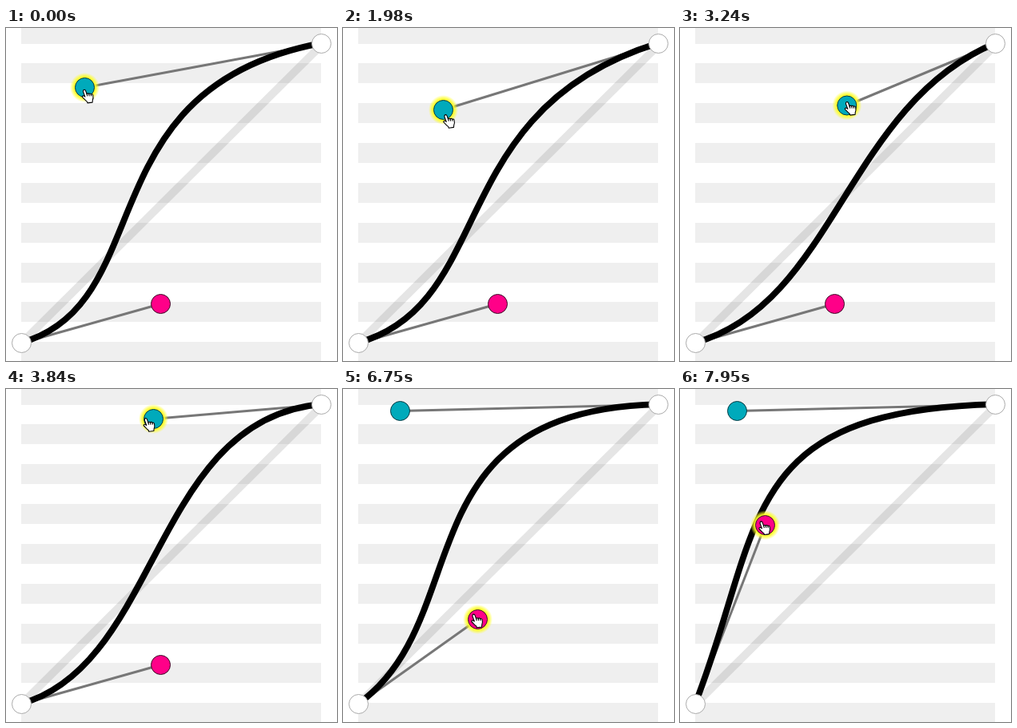
An HTML page for the animation above (8000 ms loop, 414x417 px).

```html
<!DOCTYPE html>
<html lang="en">
<head>
<meta charset="utf-8">
<title>Curve editor</title>
<style>
  html, body { margin: 0; width: 100%; height: 100%; overflow: hidden; background: #fff; }
  svg { display: block; width: 414px; height: 417px; }
</style>
</head>
<body>
<svg viewBox="0 0 414 417" xmlns="http://www.w3.org/2000/svg">
  <defs>
    <radialGradient id="halo">
      <stop offset=".7" stop-color="#ff2" stop-opacity=".95"/>
      <stop offset=".8" stop-color="#ff2" stop-opacity=".7"/>
      <stop offset="1" stop-color="#ff2" stop-opacity="0"/>
    </radialGradient>
    <clipPath id="plot"><rect x="19" width="375" height="417"/></clipPath>
  </defs>
  <g id="stripes" fill="#efefef"></g>
  <path d="M14.5 399.5L400 16" stroke="#000" stroke-opacity=".1" stroke-width="10" clip-path="url(#plot)"/>
  <g stroke="#777" stroke-width="3">
    <line id="armA" x1="19.5" y1="394.5"/>
    <line id="armB" x1="394.5" y1="19.5"/>
  </g>
  <path id="curve" fill="none" stroke="#000" stroke-width="7.8" transform="translate(-.4 -.4)"/>
  <g fill="#fff" stroke="#aaa">
    <circle cx="19.5" cy="394.5" r="12"/>
    <circle cx="394.5" cy="19.5" r="12"/>
  </g>
  <g id="knobA">
    <circle class="halo" r="18.5" fill="url(#halo)"/>
    <circle r="12" fill="#f08" stroke="#3a1028"/>
  </g>
  <g id="knobB">
    <circle class="halo" r="18.5" fill="url(#halo)"/>
    <circle r="12" fill="#0ab" stroke="#053a42"/>
  </g>
  <g id="hand" stroke="#000" stroke-width="1.1" stroke-linejoin="round" stroke-linecap="round">
    <path fill="#fff" d="M2.2 1.6C3 .4 4.6 .6 5.1 2L6.6 6.2C7 5.2 8.6 5 9.2 6.3C9.8 5.2 11.4 5.3 11.8 6.6C12.6 5.8 14 6.3 14.2 7.6C14.8 10 14.7 12 13.8 14L13.6 16.6L7.4 17.4L6.8 15.6C4.8 14.2 3.2 12.2 1.2 10.4C.2 9.2 1.6 7.8 3 8.6L4.4 9.6L2 3.2Z"/>
    <path fill="none" d="M6.6 6.2L7.3 8.4M9.2 6.3L9.7 8.4M11.8 6.6L12.1 8.4"/>
  </g>
</svg>
<script>
const LOOP = 8000, STEP = 30;
const LEAD = 80;                      // the pointer runs this far ahead of the knob, in ms
const LEAVE = 5220, ARRIVE = 6170, GRAB = 6270;
const $ = id => document.getElementById(id);

// Drag paths: [ms, x, y]
const teal = [
  [1230, 98.5, 74.5], [1980, 125.5, 102.5], [2580, 155.5, 124.5], [3200, 208, 100],
  [3840, 184.5, 37.5], [4500, 82, 29], [4890, 71.5, 27.5]
];
const pink = [
  [6450, 193.5, 345.5], [6750, 168.5, 288.5], [7950, 106.5, 170.5], [8100, 100, 160]
];

const clamp = u => Math.min(Math.max(u, 0), 1);
const ease = u => u * u * (3 - 2 * u);

function slope(keys, i, c) {
  const a = keys[i - 1], b = keys[i + 1];
  return a && b ? (b[c] - a[c]) / (b[0] - a[0]) : 0;
}

// Smooth Hermite path through the keys, at rest at both ends
function at(keys, t) {
  let i = 0;
  while (i < keys.length - 2 && t >= keys[i + 1][0]) i++;
  const a = keys[i], b = keys[i + 1], span = b[0] - a[0];
  const u = clamp((t - a[0]) / span), v = 1 - u;
  return [1, 2].map(c =>
    ease(v) * a[c] + ease(u) * b[c] +
    span * u * v * (v * slope(keys, i, c) - u * slope(keys, i + 1, c)));
}

function pointer(t) {
  const from = at(teal, t + LEAD), to = at(pink, t + LEAD);
  const u = ease(clamp((t - LEAVE) / (ARRIVE - LEAVE)));
  return [from[0] + (to[0] - from[0]) * u - 4, from[1] + (to[1] - from[1]) * u + 2];
}

function place(el, [x, y]) {
  el.setAttribute("transform", `translate(${x.toFixed(2)} ${y.toFixed(2)})`);
}

function knob(name, p, active) {
  const el = $("knob" + name), arm = $("arm" + name);
  place(el, p);
  el.querySelector(".halo").style.display = active ? "" : "none";
  arm.setAttribute("x2", p[0]);
  arm.setAttribute("y2", p[1]);
}

function draw(ms) {
  const t = Math.floor(ms / STEP) * STEP, a = at(pink, t), b = at(teal, t);
  knob("A", a, t >= GRAB);
  knob("B", b, t < GRAB);
  $("curve").setAttribute("d", `M19.5 394.5C${a} ${b} 394.5 19.5`);
  place($("hand"), pointer(t));
}

for (let k = 0; k < 9; k++) {
  const y = Math.round(k * 49.85 - 5.5);
  $("stripes").innerHTML += `<rect x="19" y="${y}" width="375" height="25"/>`;
}

const start = performance.now();
function loop() {
  draw((performance.now() - start) % LOOP);
  requestAnimationFrame(loop);
}
loop();
</script>
</body>
</html>
```
